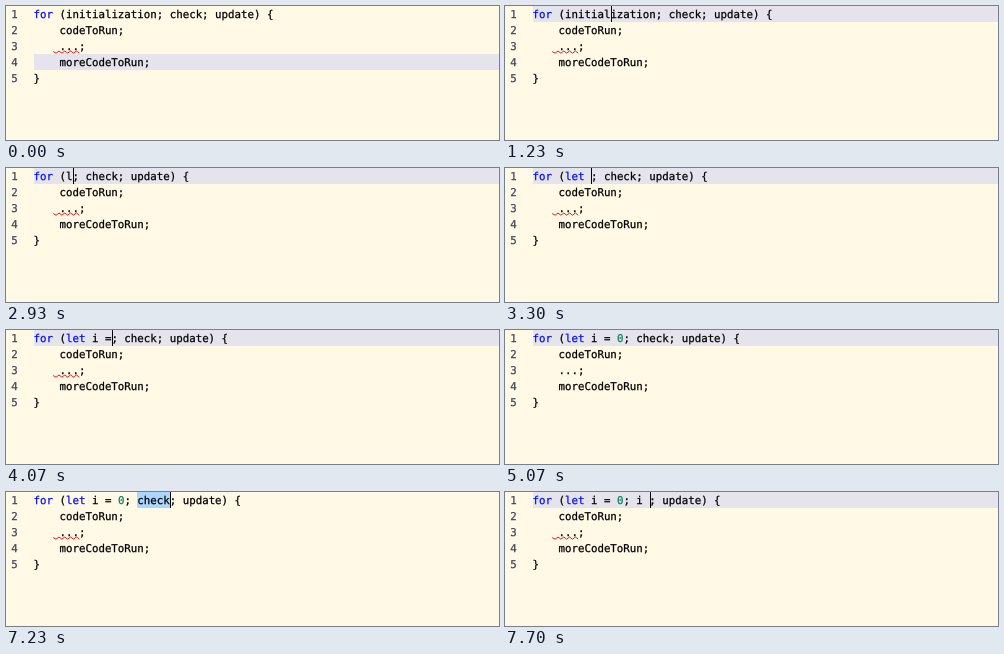
Write an HTML page that moves like this. It is 493 by 134 pixels and loops after 8000 ms.

```html
<!DOCTYPE html>
<html lang="en">
<head>
<meta charset="utf-8">
<title>Editing a for loop</title>
<style>
  html, body { margin: 0; width: 100%; height: 100%; overflow: hidden; background: #fff9e6; }
  svg { display: block; }
  text {
    font: 10.77px "DejaVu Sans Mono", monospace;
    text-rendering: geometricPrecision;
    white-space: pre;
    color: #000;
  }
  text, tspan { fill: currentColor; stroke: currentColor; stroke-width: .25px; }
  .number { color: #3c4858; }
  .keyword { color: #0010ff; }
  .literal { color: #09805a; }
</style>
</head>
<body>
<svg id="stage" width="493" height="134" viewBox="0 0 493 134"></svg>
<script>
const LOOP = 8000, LEFT = 27.6, CHAR = 6.483, ROW = 16, BASELINE = 11.8;
const stage = document.getElementById('stage');

// Each entry changes only the listed parts of the editor state.
const timeline = [
  [0, { init: 'initialization', check: 'check', row: 3, col: 18, caret: false, active: true, select: null, error: true }],
  [170, { caret: true }],
  [670, { caret: false }],
  [1170, { caret: true }],
  [1230, { row: 0, col: 12 }],
  [1400, { col: 19, select: [5, 19], active: false }],
  [1900, { caret: false }],
  [2400, { caret: true }],
  [2900, { caret: false }],
  [2930, { init: 'l', col: 6, select: null, active: true, caret: true }],
  [3100, { init: 'le', col: 7 }],
  [3200, { init: 'let', col: 8 }],
  [3300, { init: 'let ', col: 9 }],
  [3600, { init: 'let i', col: 10 }],
  [3770, { init: 'let i ', col: 11 }],
  [4070, { init: 'let i =', col: 12 }],
  [4230, { init: 'let i = ', col: 13 }],
  [4570, { init: 'let i = 0', col: 14 }],
  [5070, { caret: false, error: false }],
  [5570, { caret: true }],
  [5900, { caret: false }],
  [5930, { col: 20, caret: true }],
  [6230, { col: 21, select: [16, 21], active: false }],
  [6300, { error: true }],
  [6730, { caret: false }],
  [7230, { caret: true }],
  [7530, { check: 'i', col: 17, select: null, active: true }],
  [7700, { check: 'i ', col: 18 }]
];

function add(name, attributes = {}) {
  const node = document.createElementNS('http://www.w3.org/2000/svg', name);
  for (const key in attributes) node.setAttribute(key, attributes[key]);
  return stage.appendChild(node);
}

const columnX = col => LEFT + col * CHAR;
const show = (node, visible) => node.setAttribute('visibility', visible ? 'visible' : 'hidden');

add('rect', { width: 493, height: 134, fill: '#fff9e6' });
const activeLine = add('rect', { x: 28, width: 465, height: ROW, fill: '#e5e4ec' });
const selection = add('rect', { y: 0, height: ROW, fill: '#add6ff' });

const lines = ['', '    codeToRun;', '    ...;', '    moreCodeToRun;', '}'].map((content, row) => {
  const y = row * ROW + BASELINE;
  add('text', { x: 5.3, y, class: 'number' }).textContent = row + 1;
  const line = add('text', { x: LEFT, y });
  line.textContent = content;
  return line;
});

let wave = 'M47.2 45.6';
for (let i = 1; i <= 9; i++) wave += ` L${47.2 + i * 2.9} ${i % 2 ? 47.2 : 45}`;
const squiggle = add('path', { d: wave, fill: 'none', stroke: '#e51a1a', 'stroke-width': 1 });
const caret = add('rect', { width: 1, height: ROW, fill: '#000' });

function highlight(code) {
  return code
    .replace(/\b\d+\b/g, '<tspan class="literal">$&</tspan>')
    .replace(/\b(for|let)\b/g, '<tspan class="keyword">$&</tspan>');
}

let shownCode = '';

function render(time) {
  const state = {};
  for (const [start, change] of timeline) if (start <= time) Object.assign(state, change);

  const code = `for (${state.init}; ${state.check}; update) {`;
  if (code !== shownCode) lines[0].innerHTML = highlight(shownCode = code);

  activeLine.setAttribute('y', state.row * ROW);
  show(activeLine, state.active);

  show(selection, state.select);
  if (state.select) {
    const [from, to] = state.select.map(columnX);
    selection.setAttribute('x', Math.floor(from));
    selection.setAttribute('width', Math.ceil(to) - Math.floor(from));
  }

  show(squiggle, state.error);
  caret.setAttribute('x', Math.ceil(columnX(state.col)));
  caret.setAttribute('y', state.row * ROW);
  show(caret, state.caret);
}

const began = performance.now();
function tick() {
  render((performance.now() - began) % LOOP);
  requestAnimationFrame(tick);
}
tick();
</script>
</body>
</html>
```
